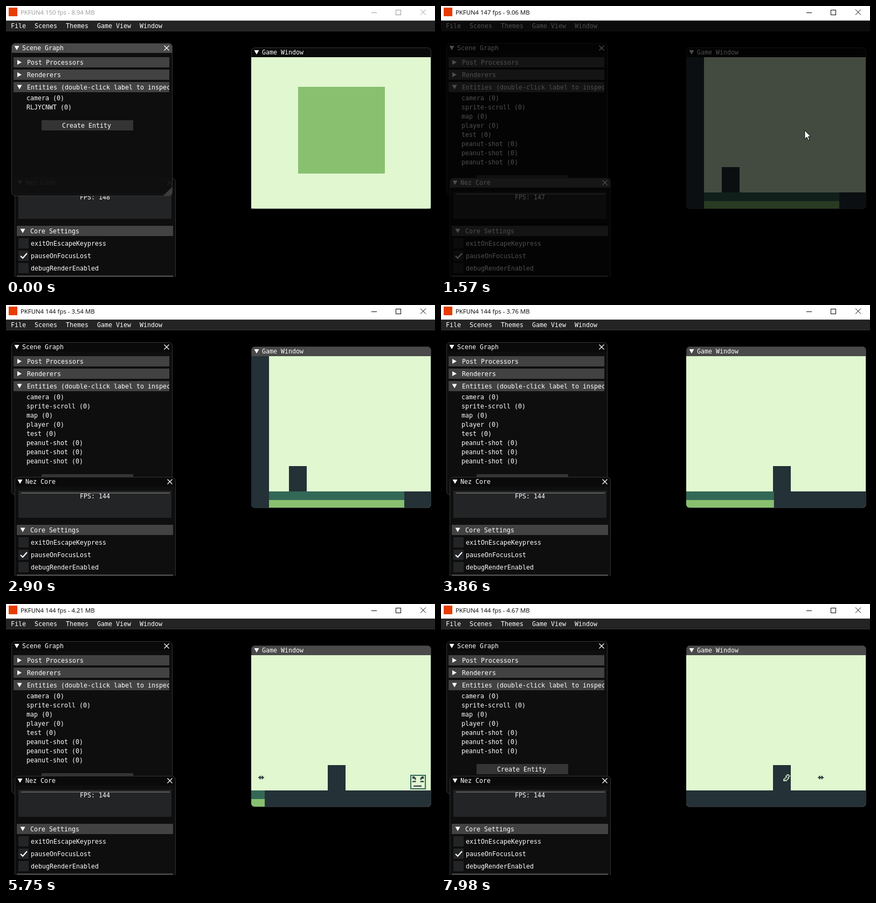
Animation, 796 px wide and 503 px high, one loop 8 s. Source, as an HTML page with a canvas:

```html
<!DOCTYPE html>
<html lang="en">
<head>
<meta charset="utf-8">
<title>Engine editor</title>
<style>
html, body { margin: 0; width: 100%; height: 100%; overflow: hidden; background: #000; }
canvas { display: block; width: 796px; height: 503px; }
</style>
</head>
<body>
<canvas id="stage" width="796" height="503"></canvas>
<script>
const c = document.getElementById('stage').getContext('2d');
const LOOP = 8000, SCENE_SWAP = 1250;
const MONO = '11.63px "DejaVu Sans Mono", "Liberation Mono", monospace';
const SANS = '11.4px "Open Sans", "Noto Sans", sans-serif';
const LIGHT = '#e0f7d0', GREEN = '#88c070', TEAL = '#346856', DARK = '#243137';
const HEADER = '#424242', ACTIVE = '#4a4a4a', IDLE = '#0a0a0a', FRAME = '#232426', BORDER = '#343436';

// Game world: one art pixel is PX wide; the camera keeps the player between DEAD_LEFT and DEAD_RIGHT.
const PX = 334 / 160, FLOOR = 346;
const START_X = 521, DEAD_LEFT = 597, DEAD_RIGHT = 616, ENEMY_X = 1009;
const RUN_SPEED = .2215, SHOT_SPEED = .418, JUMP_TIME = 500, JUMP_HEIGHT = 75;
const runs = [
  { from: 2885, to: 4600, dir: 1 },
  { from: 5540, to: 5743, dir: -1 },
  { from: 5960, to: 6113, dir: 1 },
  { from: 7430, to: 7500, dir: 1 },
];
const jumps = [2380, 4940];

const clamp = (v, lo, hi) => Math.max(lo, Math.min(hi, v));
const ramp = (t, from, to) => clamp((t - from) / (to - from), 0, 1);
const smooth = p => p * p * (3 - 2 * p);

function motion(t) {
  let x = START_X, scroll = 0;
  for (const { from, to, dir } of runs) {
    x += dir * RUN_SPEED * (clamp(t, from, to) - from);
    scroll = Math.max(0, clamp(scroll, x - DEAD_RIGHT, x - DEAD_LEFT));
  }
  return { x, scroll };
}

function makeShot(start, dir) {
  const x = motion(start).x + 16.5 + dir * 9;
  const hit = dir > 0 ? start + (ENEMY_X - x) / SHOT_SPEED : Infinity;
  return { start, dir, x, hit };
}
const shots = [makeShot(5330, -1), ...[6310, 6720, 7200, 7830].map(start => makeShot(start, 1))];
const enemyDeath = shots[3].hit;

const peanut = ['.#.#.', '#####', '.#.#.'];
const tossed = ['...##.', '..#..#', '..#.#.', '.#..#.', '#..#..', '###...'];
const face = ['.##......##.', '.###....###.', '...#....#...', '', '.###....###.', '', '', '', '..#######...'];

function rect(x, y, w, h, color) {
  c.fillStyle = color;
  c.fillRect(x, y, w, h);
}

function text(str, x, mid, color = '#fff', font = MONO) {
  c.font = font;
  c.fillStyle = color;
  c.fillText(str, x, mid + 4);
}

function trace(points) {
  c.beginPath();
  points.forEach(([x, y]) => c.lineTo(x, y));
}

function poly(points, color) {
  trace(points);
  c.fillStyle = color;
  c.fill();
}

function line(points, color, width = 1) {
  trace(points);
  c.strokeStyle = color;
  c.lineWidth = width;
  c.stroke();
}

function clipped(x, y, w, h, radius, paint) {
  c.save();
  c.beginPath();
  c.roundRect(x, y, w, h, radius);
  c.clip();
  paint();
  c.restore();
}

function cross(x, y, r, color, width = 1.2) {
  line([[x - r, y - r], [x + r, y + r]], color, width);
  line([[x - r, y + r], [x + r, y - r]], color, width);
}

function arrow(x, y, open) {
  poly(open ? [[x - 4.5, y - 4], [x + 4.5, y - 4], [x, y + 4]]
            : [[x - 4, y - 4.5], [x + 4, y], [x - 4, y + 4.5]], '#fff');
}

function sprite(rows, cx, cy, color) {
  const left = cx - rows[0].length * PX / 2, top = cy - rows.length * PX / 2;
  rows.forEach((row, j) => [...row].forEach((ch, i) => {
    if (ch === '#') rect(left + i * PX, top + j * PX, PX + .1, PX + .1, color);
  }));
}

function panel(x, y, w, h, title, active, closable, body) {
  clipped(x, y, w, h, 7, () => {
    rect(x, y, w, h, 'rgba(15,15,15,.94)');
    rect(x, y, w, 18, active ? ACTIVE : IDLE);
    arrow(x + 10, y + 9, true);
    text(title, x + 20, y + 9);
    if (closable) cross(x + w - 11, y + 9, 4.5, '#fff');
    body();
  });
  c.strokeStyle = BORDER;
  c.lineWidth = 1;
  c.beginPath();
  c.roundRect(x + .5, y + .5, w - 1, h - 1, 7);
  c.stroke();
}

function header(x, y, w, label, open) {
  rect(x, y, w, 19, HEADER);
  arrow(x + 11, y + 9.5, open);
  text(label, x + 25, y + 10);
}

function entityNames(t) {
  if (t < SCENE_SWAP) return ['camera', 'RLJYCNWT'];
  const target = t < enemyDeath ? ['test'] : [];
  return ['camera', 'sprite-scroll', 'map', 'player', ...target, ...Array(3).fill('peanut-shot')];
}

function sceneGraph(t, active) {
  const names = entityNames(t);
  panel(10, 69, 299, 284, 'Scene Graph', active, true, () => {
    clipped(10, 87, 293, 266, 0, () => {
      ['Post Processors', 'Renderers', 'Entities (double-click label to inspect)']
        .forEach((label, i) => header(14, 95 + i * 23, 289, label, i === 2));
      names.forEach((name, i) => text(name + ' (0)', 38, 171 + i * 17));
      const mid = 188 + names.length * 17;
      rect(66, mid - 10, 170, 19, '#343434');
      text('Create Entity', 104, mid);
    });
    poly([[308, 336], [308, 353], [291, 353]], '#3d3d3d');
  });
}

function nezCore(t, active) {
  const fps = t < 850 ? 148 : t < 1780 ? 147 : t < 2090 ? 128 : 144;
  panel(16, 319, 299, 220, 'Nez Core', active, true, () => {
    rect(23, 345, 284, 50, FRAME);
    rect(28, 348, 276, 2, '#5c5c5c');
    text('FPS: ' + fps, 137, 355);
    header(20, 408, 290, 'Core Settings', true);
    ['exitOnEscapeKeypress', 'pauseOnFocusLost', 'debugRenderEnabled'].forEach((label, i) => {
      rect(23, 431 + i * 23, 19, 19, FRAME);
      text(label, 46, 441 + i * 23);
    });
    line([[27, 464], [31, 468], [39, 459]], '#fff', 2.2);
    rect(20, 500, 290, 19, HEADER);
  });
}

function enemy(x, t) {
  if (t >= enemyDeath) return;
  rect(x, 317, 29, 27, TEAL);
  if (shots.some(({ hit }) => t >= hit && t < hit + 70)) return;
  rect(x + 2, 319, 25, 23, LIGHT);
  sprite(face, x + 14.5, 329.5, DARK);
}

function level(t) {
  const { x, scroll } = motion(t);
  rect(455, FLOOR, 334, 31, DARK);
  rect(488 - scroll, FLOOR, 251, 16, TEAL);
  rect(488 - scroll, FLOOR + 16, 251, 15, GREEN);
  rect(455 - scroll, 95, 33, 282, DARK);
  enemy(ENEMY_X - scroll, t);

  const lift = jumps.reduce((sum, start) => {
    const p = ramp(t, start, start + JUMP_TIME);
    return sum + JUMP_HEIGHT * 4 * p * (1 - p);
  }, 0);
  rect(Math.round(x - scroll), Math.round(299 - lift), 33, 47, DARK);

  for (const shot of shots) {
    const age = t - shot.start, fromX = shot.x - scroll;
    if (age < 0 || t >= shot.hit && shot.hit <= enemyDeath) continue;
    sprite(peanut, fromX + shot.dir * SHOT_SPEED * age, 322, DARK);
    if (age < 190) sprite(tossed, fromX - shot.dir * 10 * (1 - ramp(age, 0, 150)), 322.5, LIGHT);
  }
}

function gameWindow(t, active) {
  panel(455, 77, 334, 300, 'Game Window', active, false, () => {});
  const playing = t >= SCENE_SWAP;
  clipped(455, 95, 333, 281, playing ? [0, 0, 6, 6] : 0, () => {
    rect(455, 95, 333, 281, LIGHT);
    if (playing) return level(t);
    c.globalAlpha = 1 - ramp(t, 100, 500);
    rect(542, 150, 161, 161, GREEN);
  });
}

function titleBar(t) {
  const ink = t < 130 ? '#999' : '#000';
  // Statistics refresh every 930 ms; memory grows steadily after the scene loads.
  const tick = Math.floor((t + 80) / 930);
  const fps = [150, 147, 128][tick] || 144;
  const memory = tick < 2 ? 8.94 + tick * .12 : 3.31 + (tick - 2) * .226;
  rect(0, 0, 796, 27, '#fff');
  rect(5, 3, 16, 16, '#e73c00');
  text(`PKFUN4 ${fps} fps - ${memory.toFixed(2)} MB`, 27, 12, ink, SANS);
  line([[678, 12.5], [688, 12.5]], ink);
  c.strokeRect(723.5, 7.5, 9, 9);
  cross(774, 11.5, 5, ink, 1);
}

function menuBar() {
  rect(0, 27, 796, 20, BORDER);
  rect(0, 28, 796, 18, '#242424');
  let x = 9;
  for (const label of ['File', 'Scenes', 'Themes', 'Game View', 'Window']) {
    text(label, Math.round(x), 37);
    x += label.length * 7 + 16;
  }
}

function cursor(t) {
  if (t < 100 || t > 2090) return;
  const enter = smooth(ramp(t, 100, 900)), cross = smooth(ramp(t, 1000, 1880));
  c.save();
  c.translate(690.5 + 79 * enter - 132 * cross, 320.5 - 84 * enter - 8 * cross);
  const shape = [[0, 0], [0, 16], [4, 12.5], [6.5, 18.5], [9, 17.5], [6.5, 11.5], [11, 11.5]];
  poly(shape, '#fff');
  line([...shape, shape[0]], '#000');
  c.restore();
}

function draw(t) {
  rect(0, 0, 796, 503, '#000');
  menuBar();

  const focus = t < 130 ? 'scene' : t < SCENE_SWAP ? 'game' : t < 2000 ? 'core' : 'game';
  const windows = [() => nezCore(t, focus === 'core'), () => sceneGraph(t, focus === 'scene')];
  if (t >= SCENE_SWAP) windows.reverse();
  windows.forEach(show => show());
  gameWindow(t, focus === 'game');

  const dim = Math.min(ramp(t, 400, 1200), 1 - ramp(t, 1320, 2150));
  rect(0, 27, 796, 476, `rgba(0,0,0,${dim})`);
  titleBar(t);
  cursor(t);
}

const begin = performance.now();
function frame() {
  draw((performance.now() - begin) % LOOP);
  requestAnimationFrame(frame);
}
frame();
</script>
</body>
</html>
```
